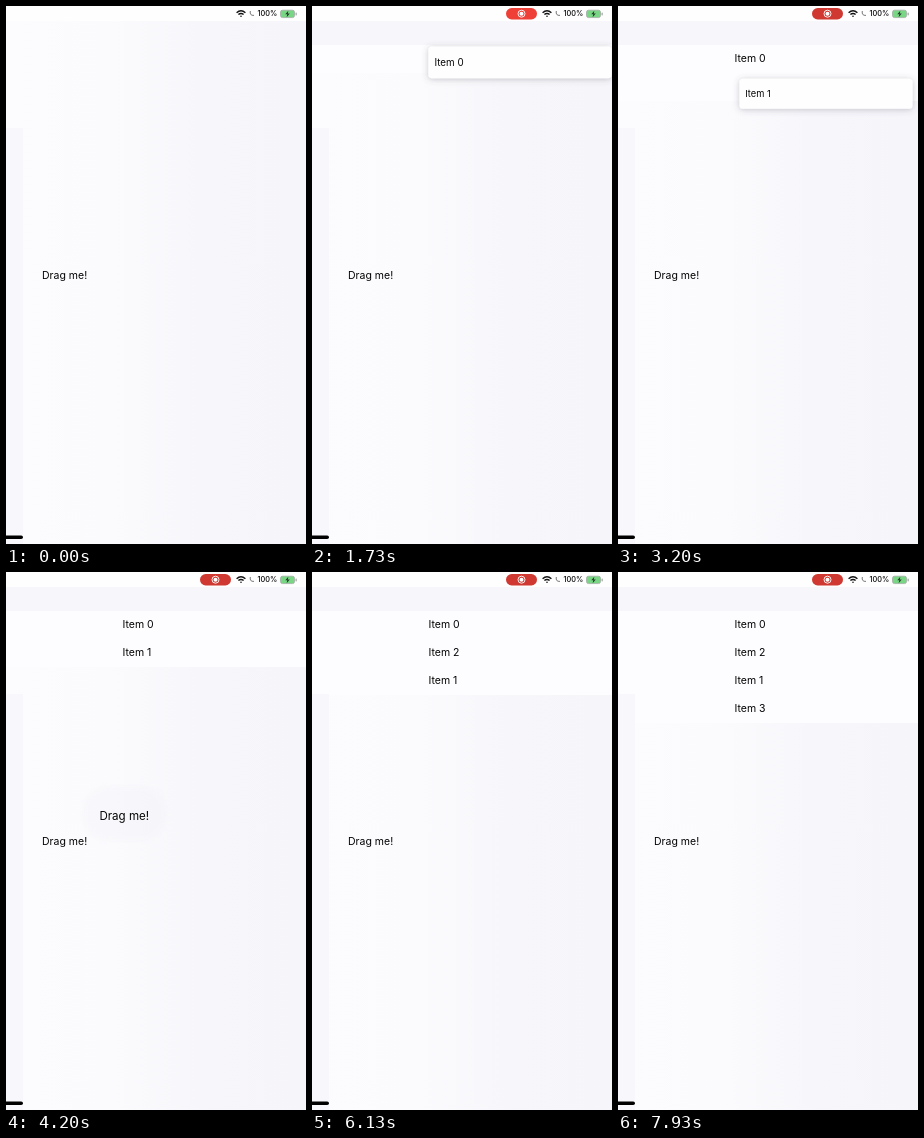
An HTML page for the animation above (8 s loop, 300x538 px).

```html
<!DOCTYPE html>
<html lang="en">
<head>
<meta charset="utf-8">
<title>Drag into list</title>
<style>
  html, body { margin: 0; width: 100%; height: 100%; overflow: hidden; background: #fafafd; }
  svg { display: block; width: 100%; height: 100%; }
  text { font: 10.5px Inter, sans-serif; fill: #050505; }
  .status { font-size: 7.3px; font-weight: 500; }
  .pill { animation: pulse 8s linear infinite; }
  @keyframes pulse {
    0%, 4.9% { fill: #ee4036; opacity: 0; }
    5%, 21.6% { fill: #ee4036; opacity: 1; }
    40%, 100% { fill: #cf3931; opacity: 1; }
  }
</style>
</head>
<body>
<svg viewBox="0 0 300 538" preserveAspectRatio="none">
  <defs>
    <linearGradient id="paper">
      <stop offset="0" stop-color="#fcfbfe"/>
      <stop offset=".35" stop-color="#fbfafd"/>
      <stop offset=".65" stop-color="#f7f6fa"/>
      <stop offset="1" stop-color="#f6f5fa"/>
    </linearGradient>
    <filter id="shadow" x="-12%" y="-60%" width="124%" height="220%">
      <feDropShadow dx="0" dy="1" stdDeviation="3.5" flood-color="#55555c" flood-opacity=".32"/>
    </filter>
    <filter id="soft"><feGaussianBlur stdDeviation="2"/></filter>
  </defs>
  <rect width="300" height="538" fill="url(#paper)"/>
  <rect width="300" height="15" fill="#fefeff"/>
  <rect id="header" y="15" width="300" height="24" fill="#f7f6fa"/>
  <rect id="list" y="39" width="300" fill="#fdfcfe"/>
  <rect y="122" width="17" height="416" fill="#f8f7fb"/>
  <text x="36" y="273">Drag me!</text>
  <g id="rows"></g>
  <g id="drags"></g>

  <g class="pill">
    <rect x="194" y="2" width="31" height="11.5" rx="5.7"/>
    <circle cx="209.5" cy="7.7" r="3.5" fill="none" stroke="#fff" stroke-width=".9"/>
    <circle cx="209.5" cy="7.7" r="2" fill="#fff"/>
  </g>
  <g fill="none" stroke="#111" stroke-width="1.4">
    <path d="M230.6 6.7Q235 2.6 239.4 6.7M232.4 8.6Q235 6.3 237.6 8.6"/>
    <circle cx="235" cy="10.2" r=".8" fill="#111" stroke="none"/>
    <path d="M244.3 5Q243.4 9.7 248 9.4" stroke="#777" stroke-width="1"/>
  </g>
  <text class="status" x="251.5" y="10.4">100%</text>
  <rect x="274.5" y="4.2" width="14" height="7.4" rx="2" fill="#78d684" stroke="#a5aaa6" stroke-width=".8"/>
  <rect x="289.5" y="6.4" width="1.3" height="3" rx=".6" fill="#a5aaa6"/>
  <path d="M282.3 4.7 279.3 8.3h2l-.7 2.9 3.2-3.8h-2z" fill="#243a28"/>
  <rect x="-4" y="529.5" width="21" height="3.6" rx="1.8" fill="#000"/>
</svg>
<script>
const LOOP = 8000, ROW = 28, TOP = 52;

// path: [time, x, y]; drop starts the stretch, cell starts the landing
const drags = [
  { slot: 0, drop: 1200, cell: 1580, path: [[350, 58, 269], [600, 72, 252], [850, 128, 185], [1150, 190, 66]] },
  { slot: 1, drop: 2780, cell: 3170, path: [[2080, 58, 269], [2280, 78, 255], [2500, 140, 180], [2720, 190, 92]] },
  { slot: 1, drop: 4750, cell: 5150, path: [[3920, 58, 269], [4060, 76, 262], [4200, 118, 244], [4420, 165, 160], [4680, 192, 88]] },
  { slot: 3, drop: 7380, cell: 7600, path: [[6760, 58, 269], [6960, 92, 256], [7130, 150, 225], [7270, 183, 174], [7370, 195, 144]] }
];

const $ = id => document.getElementById(id);
const clamp = v => Math.max(0, Math.min(1, v));
const mix = (a, b, p) => a + (b - a) * p;
const span = (t, start, length) => clamp((t - start) / length);
const ease = p => p * p * (3 - 2 * p);

function add(parent, tag, attrs, text = '') {
  const node = document.createElementNS('http://www.w3.org/2000/svg', tag);
  set(node, attrs);
  node.textContent = text;
  return parent.appendChild(node);
}
function set(node, attrs) {
  for (const key in attrs) node.setAttribute(key, attrs[key]);
}
function pointAt(path, t) {
  const i = path.findIndex(p => p[0] > t);
  if (i === 0) return path[0].slice(1);
  if (i < 0) return path[path.length - 1].slice(1);
  const [a, b] = [path[i - 1], path[i]];
  const p = (t - a[0]) / (b[0] - a[0]);
  return [mix(a[1], b[1], p), mix(a[2], b[2], p)];
}

drags.forEach((d, i) => {
  const blob = { x: -42, y: -28, width: 84, height: 56, rx: 25, fill: '#efeef4', filter: 'url(#soft)' };
  d.row = add($('rows'), 'g', {});
  d.card = add(d.row, 'rect', { x: -98, y: -17, width: 196, height: 34, rx: 4, fill: '#fefeff', filter: 'url(#shadow)' });
  add(d.row, 'text', { x: -91.5, y: 4 }, 'Item ' + i);
  d.gap = add($('drags'), 'rect', { x: 111, y: TOP + d.slot * ROW - 13, width: 175, height: 28, fill: '#f1f0f4', filter: 'url(#soft)' });
  d.tail = add($('drags'), 'g', {});
  add(d.tail, 'rect', blob);
  d.halo = add($('drags'), 'rect', blob);
  d.badge = add($('drags'), 'g', {});
  add(d.badge, 'circle', { r: 5.2, fill: '#75c98b' });
  add(d.badge, 'path', { d: 'M-2.7 0h5.4M0-2.7v5.4', stroke: '#fff', 'stroke-width': 1.2 });
  d.label = add($('drags'), 'text', { x: 0, y: 4, 'text-anchor': 'middle' }, 'Drag me!');
});

function drawDrag(d, t) {
  const start = d.path[0][0];
  const held = t >= start && t < d.drop;
  const active = t >= start && t < d.cell;
  const [x, y] = pointAt(d.path, t);
  const [tx, ty] = pointAt(d.path, t - 140);
  const over = held ? span(235 - y, 0, 50) : 0;
  const morph = span(t, d.drop, d.cell - d.drop);
  const lift = mix(1, 1.1, span(t, start, 150));
  const go = ease(clamp(morph * 2.5));
  const px = mix(x, 195, go), py = mix(y, TOP + d.slot * ROW + 2, go);

  set(d.label, {
    transform: `translate(${px} ${py}) scale(${lift + 1.6 * morph} ${lift + .7 * morph})`,
    opacity: active ? 1 - .88 * morph : 0
  });
  set(d.halo, { transform: `translate(${x} ${y - 2})`, opacity: held ? .2 + .8 * over : 0 });
  set(d.tail, { transform: `translate(${tx} ${ty})`, opacity: over });
  set(d.badge, { transform: `translate(${tx + 13} ${ty - 11})`, opacity: over });
  set(d.gap, { opacity: active && !held ? morph : 0 });
}

function drawRow(d, i, t) {
  const land = ease(span(t, d.cell, 320));
  const shift = i === 1 ? ease(span(t, 4620, 230)) * ROW : 0;
  const y = TOP + d.slot * ROW + shift + mix(8, 0, land);
  set(d.row, {
    transform: `translate(208 ${y}) scale(${mix(.88, 1, land)})`,
    opacity: t >= d.cell ? 1 : 0
  });
  set(d.card, { opacity: 1 - span(land, .65, .35) });
}

function frame(now) {
  const t = now % LOOP;
  drags.forEach((d, i) => { drawDrag(d, t); drawRow(d, i, t); });
  const count = drags.reduce((sum, d) => sum + ease(span(t, d.drop, 200)), 0);
  set($('list'), { height: count * ROW });
  set($('header'), { opacity: clamp(count) });
  requestAnimationFrame(frame);
}
frame(performance.now());
</script>
</body>
</html>
```
